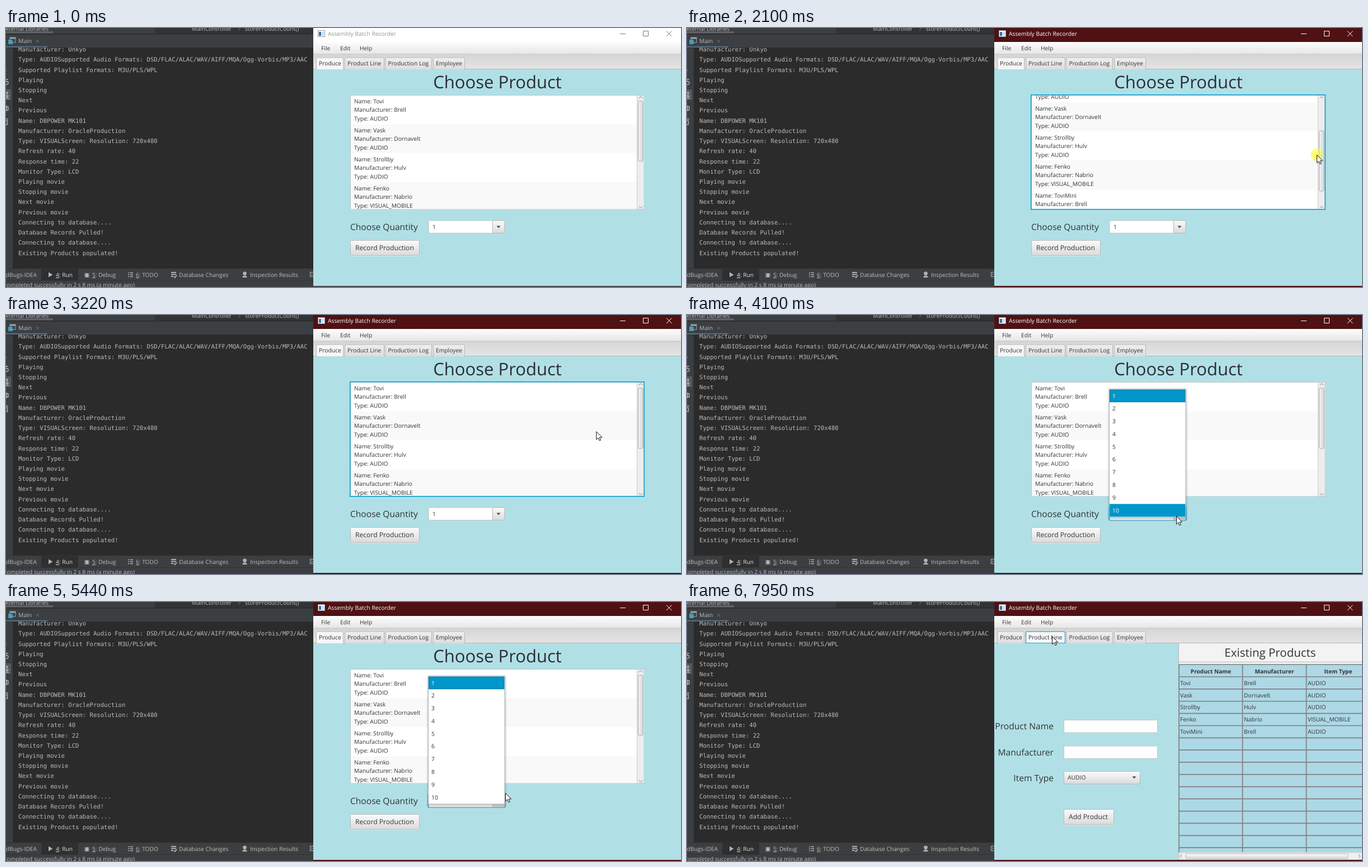
Recreate the animation shown at these times as an HTML page. Size 1206 by 464 pixels, loop 8 s.

```html
<!DOCTYPE html>
<html lang="en">
<head>
<meta charset="utf-8">
<title>Assembly Batch Recorder</title>
<style>
html, body { margin: 0; width: 100%; height: 100%; overflow: hidden; background: #3c3f41; }
svg { display: block; }
text { font-family: "Open Sans", "Noto Sans", sans-serif; text-rendering: geometricPrecision; white-space: pre; }
.mono { font-family: "DejaVu Sans Mono", monospace; }
</style>
</head>
<body>
<svg id="stage" width="1206" height="464" viewBox="0 0 1206 464" xmlns="http://www.w3.org/2000/svg"></svg>
<script>
const LOOP = 8000, BLUE = '#1fa5d0', PICK = '#0096c9', INK = '#333', POWDER = '#b0e0e6';
const svg = document.getElementById('stage');

function el(tag, attrs, parent = svg) {
  const node = document.createElementNS('http://www.w3.org/2000/svg', tag);
  for (const k in attrs) node.setAttribute(k, attrs[k]);
  parent.appendChild(node);
  return node;
}
const group = (parent = svg, attrs = {}) => el('g', attrs, parent);
const rect = (p, x, y, width, height, fill, more) => el('rect', { x, y, width, height, fill, ...more }, p);
const path = (p, d, stroke, more) => el('path', { d, stroke, fill: 'none', ...more }, p);
// y is the optical middle of the line
function label(p, x, y, str, size = 10.3, fill = INK, more) {
  const node = el('text', { x, y: y + size * .36, 'font-size': size, fill, ...more }, p);
  node.textContent = str;
  return node;
}
const defs = el('defs', {});
function grad(id, from, to, flat) {
  const g = el('linearGradient', { id, x1: 0, y1: 0, x2: flat ? 1 : 0, y2: flat ? 0 : 1 }, defs);
  el('stop', { offset: 0, 'stop-color': from }, g);
  el('stop', { offset: 1, 'stop-color': to }, g);
  return `url(#${id})`;
}
function clip(id, x, y, w, h) {
  rect(el('clipPath', { id }, defs), x, y, w, h, '#000');
  return { 'clip-path': `url(#${id})` };
}
const show = (node, on) => { node.style.display = on ? '' : 'none'; };

const BTN = grad('btn', '#fbfbfb', '#dadada');
const MENU = grad('menu', '#fdfdfd', '#e6e6e6');
const STRIP = grad('strip', '#d6d6d6', '#e4e4e4');
const TAB = grad('tab', '#efefef', '#dadada');
const TABHOT = grad('tabhot', '#fafafa', '#e9e9e9');
const THUMB = grad('thumb', '#f2f2f2', '#d8d8d8', true);
const EDGE = { stroke: '#b8b8b8', rx: 2 };

// ---------- IDE ----------
const ide = group();
const GREY = '#bbbbbb';
rect(ide, 0, 0, 549, 464, '#3c3f41');
rect(ide, 266, 0, 283, 10, '#313335');
rect(ide, 0, 10, 549, 1.5, '#2b2b2b');
rect(ide, 0, 6, 84, 3.5, '#626068');
label(ide, 76, 1.5, 'External Libraries', 10.2, GREY, { 'text-anchor': 'end' });
label(ide, 332, 1, 'MainController', 10.2, GREY);
path(ide, 'M415 -2L418 1.5L415 5', '#777');
label(ide, 427, 1, 'storeProductCount()', 10.2, GREY);

rect(ide, 7, 17, 10, 9, '#3c3f41', { stroke: '#9aa7b0' });
rect(ide, 7, 17, 10, 2.5, '#9aa7b0');
rect(ide, 4, 21, 8, 8, '#40b6e0', { opacity: .75 });
label(ide, 22, 23, 'Main', 10.4, GREY);
path(ide, 'M54 21L59 26M59 21L54 26', '#777');
rect(ide, 0, 35, 549, 396, '#2b2b2b');
rect(ide, 0, 32.5, 74, 2.5, '#56697a');
rect(ide, 0, 36, 12, 395, '#3c3f41');
rect(ide, 0, 110, 9, 19, '#55595c');
path(ide, 'M0 76H1M4 92H0V96Q4 95 4 98Q4 102 0 101M0 116H4M2 114V123M0 121L2 124L5 121M0 126H5M0 141H4V147H0M1 139V149M0 163H4M0 166H2.5V173H0', '#afb1b3', { 'stroke-width': 1.4 });

const log = group(ide, clip('logbox', 12, 35, 537, 395));
`Manufacturer: Onkyo
Type: AUDIOSupported Audio Formats: DSD/FLAC/ALAC/WAV/AIFF/MQA/Ogg-Vorbis/MP3/AAC
Supported Playlist Formats: M3U/PLS/WPL
Playing
Stopping
Next
Previous
Name: DBPOWER MK101
Manufacturer: OracleProduction
Type: VISUALScreen: Resolution: 720x480
Refresh rate: 40
Response time: 22
Monitor Type: LCD
Playing movie
Stopping movie
Next movie
Previous movie
Connecting to database....
Database Records Pulled!
Connecting to database....
Existing Products populated!`.split('\n').forEach((s, i) =>
  label(log, 22, 38.3 + 18.22 * i, s, 10.6, GREY, { class: 'mono' }));

rect(ide, 0, 430.5, 549, 1, '#323232');
rect(ide, 63, 431.5, 66, 20.5, '#2d2f30');
rect(ide, 0, 452, 549, 1, '#323232');
label(ide, 55, 442, 'FindBugs-IDEA', 10.2, GREY, { 'text-anchor': 'end' });
[[89, '4: Run', '#e0e0e0', 1], [154, '5: Debug', GREY, 1], [232, '6: TODO', GREY, 1],
 [309, 'Database Changes', GREY], [436, 'Inspection Results', GREY]].forEach(([x, s, c, under]) => {
  label(ide, x, 442, s, 10.2, c);
  if (under) rect(ide, x, 447, 6, 1, c);
});
const ICON = '#afb1b3';
path(ide, 'M76 437.5V446.5L83.5 442Z', 'none', { fill: ICON });
el('ellipse', { cx: 144.5, cy: 443, rx: 3, ry: 4, fill: ICON }, ide);
path(ide, 'M140 439L149 447M149 439L140 447M139.5 443H149.5', ICON);
path(ide, 'M218 438.5H220M218 442H220M218 445.5H220M221.5 438.5H227M221.5 442H227M221.5 445.5H227', ICON, { 'stroke-width': 1.6 });
path(ide, 'M295 438H304M295 441.5H304M295 445H299M300 445.5L302 447L305 443', ICON, { 'stroke-width': 1.8 });
path(ide, 'M423 440Q423 436.5 426.5 436.5Q430 436.5 430 440L428.5 443H424.5ZM422 447Q423 443.5 426.5 443.5Q430 443.5 431 447Z', 'none', { fill: ICON });
rect(ide, 543.5, 437.5, 8, 8, '#3c3f41', { stroke: ICON });
path(ide, 'M545 439.5L547.5 441.5L545 443.5', ICON);
label(ide, 230, 460, 'Build completed successfully in 2 s 8 ms (a minute ago)', 10.2, GREY, { 'text-anchor': 'end' });

// ---------- Window frame ----------
const win = group();
rect(win, 549, 0, 657, 462, '#f4f4f4');
function titleBar(bg, border, ink, signs) {
  const g = group(win);
  rect(g, 549, 0, 657, 25, bg);
  rect(g, 557.5, 4.5, 12, 11, '#fff', { stroke: '#8b98a5' });
  rect(g, 559, 7, 4, 7, '#2f6fa8');
  rect(g, 564, 7, 4, 7, '#cfdbe6');
  label(g, 575, 10.5, 'Assembly Batch Recorder', 10.3, ink);
  path(g, 'M1097 10.5H1107M1138.5 5.5H1147.5V14.5H1138.5ZM1180 5.5L1189.5 15M1189.5 5.5L1180 15', signs);
  rect(g, 549, 462, 657, 2, border);
  return g;
}
const idleBar = titleBar('#fff', '#45484a', '#8a9a94', '#777');
const liveBar = titleBar('#4f1114', '#4f1114', '#fff', '#fff');
rect(win, 549, 25, 657, 22, MENU);
[[563, 'File'], [597, 'Edit'], [632, 'Help']].forEach(([x, s]) => label(win, x, 36.5, s));
rect(win, 549, 47, 657, 27, STRIP);
rect(win, 549, 46.5, 657, 1, '#c4c4c4');
rect(win, 549, 73, 657, 1, '#b5b5b5');

const tabs = [[554, 49, 'Produce'], [605, 71, 'Product Line'], [677.5, 83.5, 'Production Log'], [763, 57, 'Employee']]
  .map(([x, w, s]) => {
    const face = rect(win, x + .5, 53, w - 1, 24, TAB, EDGE);
    const ring = rect(win, x + .5, 53, w - 1, 20.5, 'none', { stroke: BLUE, rx: 2, 'stroke-width': 1.2 });
    label(win, x + 5, 63.5, s);
    return { x, w, face, ring };
  });

function button(p, x, y, w, h, s) {
  rect(p, x, y + 1, w, h, 'rgba(255,255,255,.5)', { rx: 3 });
  rect(p, x + .5, y + .5, w - 1, h - 1, BTN, EDGE);
  label(p, x + 9, y + h / 2, s, 12.15);
}
const arrow = (p, x, y) => path(p, `M${x - 3.5} ${y - 2}H${x + 3.5}L${x} ${y + 2}Z`, 'none', { fill: '#4a4a4a' });

// ---------- Produce tab ----------
const items = [['Tovi', 'Brell', 'AUDIO'], ['Vask', 'Dornavelt', 'AUDIO'], ['Strollby', 'Hulv', 'AUDIO'],
  ['Fenko', 'Nabrio', 'VISUAL_MOBILE'], ['ToviMini', 'Brell', 'AUDIO']];
const produce = group();
rect(produce, 549, 74, 657, 388, POWDER);
label(produce, 878, 97, 'Choose Product', 31, '#2d2d35', { 'text-anchor': 'middle' });
rect(produce, 615.5, 120.5, 524, 204, '#fff', { stroke: '#c0c4c6' });
const rows = group(group(produce, clip('listbox', 616, 121, 511.5, 203.5)));
items.forEach((it, i) => {
  const y = 120.5 + 52 * i;
  rect(rows, 616, y, 512, 52, i % 2 ? '#f9f9f9' : '#fff');
  ['Name: ', 'Manufacturer: ', 'Type: '].forEach((k, j) => label(rows, 622, y + 10.7 + 15.5 * j, k + it[j]));
});
rect(produce, 1127.5, 121, 12, 203, '#ededed');
rect(produce, 1127, 121, 1, 203, '#cacaca');
path(produce, 'M1130.5 125.5L1134 122.8L1137.5 125.5M1130.5 319.5L1134 322.2L1137.5 319.5', '#8a8a8a');
const thumb = rect(produce, 1129.5, 131, 8.5, 108, THUMB, { ...EDGE, stroke: '#ababab' });
const listRing = rect(produce, 614.8, 119.8, 525.4, 205.2, 'none', { stroke: BLUE, 'stroke-width': 1.8 });

label(produce, 615, 356.5, 'Choose Quantity', 15.56);
const comboRing = rect(produce, 754.2, 344.2, 137.6, 23.6, 'none', { stroke: BLUE, 'stroke-width': 1.8, rx: 2 });
rect(produce, 755, 345, 136, 22.5, '#fff', { ...EDGE, stroke: '#bcc4c6' });
path(produce, 'M869.5 345H889Q891 345 891 347V365.5Q891 367.5 889 367.5H869.5Z', '#b8b8b8', { fill: BTN });
arrow(produce, 880, 356.5);
label(produce, 762, 356.5, '1');
button(produce, 615, 380, 124, 28, 'Record Production');

const PITCH = 22.78, POP_TOP = 133.5;
const popup = group(produce);
for (let i = 4; i > 0; i--)
  rect(popup, 755 - i, 133 - i + 2, 136 + 2 * i, 229 + 2 * i, '#000', { opacity: .045, rx: 3 });
rect(popup, 754.5, 132.5, 136.5, 229.5, '#fff', { stroke: '#a9b4b8' });
const options = Array.from({ length: 10 }, (_, i) => {
  const y = POP_TOP + PITCH * i;
  const bar = rect(popup, 755, y, 135.5, PITCH, PICK);
  if (!i) rect(popup, 756, y + 1, 133.5, PITCH - 2, 'none', { stroke: '#0a7ba6' });
  return { bar, text: label(popup, 760, y + PITCH / 2, i + 1) };
});

// ---------- Product Line tab ----------
const line = group();
rect(line, 549, 74, 657, 388, POWDER);
[[222.5, 'Product Name'], [269, 'Manufacturer'], [315.5, 'Item Type']].forEach(([y, s], i) => {
  label(line, 655, y, s, 15.6, INK, { 'text-anchor': 'end' });
  if (i < 2) rect(line, 673.5, y - 11, 167, 22.5, '#fff', { ...EDGE, stroke: '#bcc8ca' });
});
rect(line, 673.5, 303.5, 136, 22.5, BTN, EDGE);
label(line, 680, 314.5, 'AUDIO');
arrow(line, 799, 314.5);
button(line, 673, 371, 90, 28, 'Add Product');
rect(line, 878, 74, 328, 388, '#f3f3f3');
rect(line, 878, 107, 328, 1, '#b9b9b9');
rect(line, 878, 74, 1, 388, '#b9b9b9');
label(line, 1042, 91, 'Existing Products', 20.5, INK, { 'text-anchor': 'middle' });
rect(line, 878.5, 111.5, 328, 337, '#add8e6');
let rules = 'M878.5 112H1206M879 112V448.5M992.5 112V448.5M1106.5 112V448.5';
for (let i = 0; i < 15; i++) rules += `M878.5 ${134 + 21.87 * i}H1206`;
path(line, rules, '#808080', { 'stroke-width': 1.7 });
[[936, 'Product Name'], [1049.5, 'Manufacturer'], [1163.5, 'Item Type']].forEach(([x, s]) =>
  label(line, x, 124, s, 10.1, INK, { 'text-anchor': 'middle', 'font-weight': 700 }));
items.forEach((it, i) => it.forEach((s, j) => label(line, 881 + 114 * j, 145 + 21.87 * i, s)));
rect(line, 879, 449, 327, 12.5, '#f0f0f0', { stroke: '#cfcfcf' });
rect(line, 891, 451, 290, 8.5, BTN, EDGE);
path(line, 'M884 452L881 455.3L884 458.5M1200 452L1203 455.3L1200 458.5', '#777');

// ---------- Pointer ----------
const halo = el('circle', { r: 10.8, fill: '#ff0', opacity: .52 });
const pointer = path(svg, 'M.5 .5V14.8L3.8 11.7L6 16.8L8.3 15.8L6.1 10.9H10.6Z', '#111', { fill: '#fff', 'stroke-width': 1 });

const trail = [
  [300, 1067, 382], [460, 989, 200], [850, 989, 200], [1310, 1132, 171], [1620, 1132, 171],
  [2100, 1125, 227], [2500, 1119, 306], [2660, 1117, 325], [2820, 1114, 282], [3060, 1118, 174],
  [3140, 1112, 169], [3380, 939, 287], [3940, 874, 360], [4250, 874, 360], [4890, 862, 136],
  [4970, 862, 136], [5440, 892, 342], [5830, 914, 363], [5900, 914, 363], [6060, 900, 369],
  [6380, 720, 220], [6620, 577, 66], [6780, 669, 117], [7030, 652, 61], [LOOP, 652, 61]];
const STEP = 80;

function pointerAt(t) {
  let i = 0;
  while (i < trail.length - 2 && t >= trail[i + 1][0]) i++;
  const [t0, x0, y0] = trail[i], [t1, x1, y1] = trail[i + 1];
  const k = Math.max(0, Math.floor((t - t0) / STEP)) * STEP / (t1 - t0);
  return [x0 + (x1 - x0) * k, y0 + (y1 - y0) * k];
}

function draw(t) {
  const within = (a, b) => t >= a && t < b;
  const [x, y] = pointerAt(t);
  const at = `translate(${x} ${y})`;
  pointer.setAttribute('transform', at);
  halo.setAttribute('transform', at);
  show(pointer, t >= 300);
  show(halo, within(1550, 3140) || within(5830, 5980) || within(7570, 7720));

  const active = t >= 1550;
  show(idleBar, !active);
  show(liveBar, active);

  const page = t >= 7570 ? 1 : 0;
  show(produce, !page);
  show(line, page);
  tabs.forEach((tab, i) => {
    const hot = t >= 300 && x >= tab.x && x < tab.x + tab.w && y > 53 && y < 73;
    tab.face.setAttribute('fill', i === page ? '#f6f6f6' : hot ? TABHOT : TAB);
    show(tab.ring, i === page && t >= 5830);
  });

  const drag = within(1550, 3140) ? Math.min(75, Math.max(0, y - 174)) : 0;
  thumb.setAttribute('y', 131 + drag);
  rows.setAttribute('transform', `translate(0 ${-drag * 55.5 / 75})`);
  show(listRing, within(1550, 4100));

  const open = within(4100, 5830);
  show(comboRing, open);
  show(popup, open);
  const over = x >= 755 && x < 891 ? Math.floor((y - POP_TOP) / PITCH) : -1;
  options.forEach(({ bar, text }, i) => {
    const on = !i || i === over;
    show(bar, on);
    text.setAttribute('fill', on ? '#fff' : INK);
  });
}

const start = performance.now();
function tick() {
  draw((performance.now() - start) % LOOP);
  requestAnimationFrame(tick);
}
tick();
</script>
</body>
</html>
```
